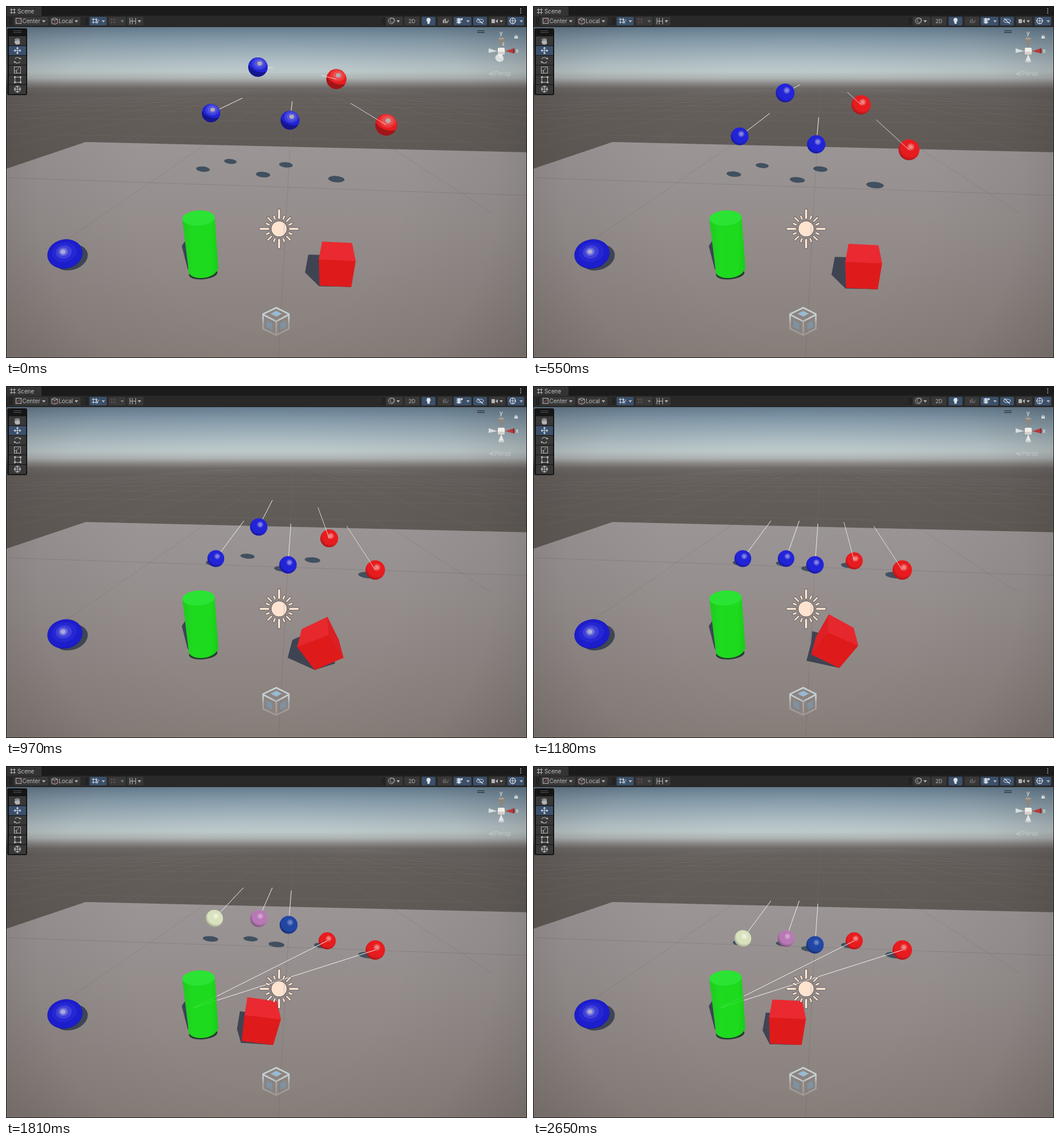
An HTML page with a canvas for the animation above (2780 ms loop, 910 px wide and 616 px high).

```html
<!DOCTYPE html>
<html lang="en">
<head>
<meta charset="utf-8">
<title>Scene</title>
<style>
html, body { margin: 0; width: 910px; height: 616px; overflow: hidden; background: #191919; }
canvas { display: block; }
</style>
</head>
<body>
<canvas id="stage" width="910" height="616"></canvas>
<script>
const W = 910, H = 616, LOOP = 2780;
let g;

// ---------- drawing helpers ----------
const mix = (a, b, p) => a + (b - a) * p;

function poly(pts, fill, stroke, width = 1) {
  g.beginPath();
  pts.forEach(([x, y]) => g.lineTo(x, y));
  if (fill) { g.closePath(); g.fillStyle = fill; g.fill(); }
  if (stroke) { g.strokeStyle = stroke; g.lineWidth = width; g.stroke(); }
}
const line = (x1, y1, x2, y2, color, width = 1) => poly([[x1, y1], [x2, y2]], null, color, width);

function oval(x, y, rx, ry, fill, rot = 0) {
  g.beginPath();
  g.ellipse(x, y, rx, ry, rot, 0, 7);
  g.fillStyle = fill;
  g.fill();
}
function ring(x, y, r, color, width = 1, from = 0, to = 6.3) {
  g.beginPath();
  g.arc(x, y, r, from, to);
  g.strokeStyle = color;
  g.lineWidth = width;
  g.stroke();
}
function rect(x, y, w, h, fill, r = 0) {
  g.beginPath();
  g.roundRect(x, y, w, h, r);
  g.fillStyle = fill;
  g.fill();
}
function frame(x, y, w, h, color) {
  g.strokeStyle = color;
  g.lineWidth = 1;
  g.strokeRect(x + .5, y + .5, w, h);
}
function text(str, x, y, color = '#b9b9b9', size = 9.8) {
  g.font = size + 'px Inter, Roboto, sans-serif';
  g.fillStyle = color;
  g.fillText(str, x, y);
}
function ramp(x0, y0, x1, y1, stops) {
  const grad = g.createLinearGradient(x0, y0, x1, y1);
  stops.forEach(([at, color]) => grad.addColorStop(at, color));
  return grad;
}

// ---------- static scenery ----------
function drawGrid(color) {
  for (let n = -9; n <= 9; n++) {
    const lean = 1.5 * n - .05;
    line(502 + 8 * lean, 145, 502 + 479 * lean, 616, color);
  }
  for (let n = 0; n < 8; n++) {
    const h = 180 / (1 + n * .9), tilt = h * .085;
    line(0, 137 + h - tilt, W, 137 + h + tilt, color);
  }
}

function drawWorld() {
  rect(0, 37, W, H, ramp(0, 37, 0, 260, [
    [0, '#677f92'], [.1, '#869cab'], [.2, '#9fb1ba'], [.3, '#b6c4c8'], [.35, '#bdc8c9'],
    [.4, '#aeb4b4'], [.44, '#8c8b89'], [.48, '#6d6966'], [.54, '#655f5c'], [1, '#605a56']]));
  g.save();
  g.beginPath();
  g.rect(0, 146, W, 120);
  g.clip();
  drawGrid('rgba(210,205,200,.06)');
  g.restore();

  g.save();
  g.beginPath();
  [[139, 238], [W, 256], [W, H], [0, H], [0, 285]].forEach(p => g.lineTo(...p));
  g.closePath();
  g.fillStyle = ramp(0, 238, 0, H, [[0, '#9b9596'], [.35, '#958e8d'], [1, '#887f7a']]);
  g.fill();
  g.clip();
  line(502, 137, 476, H, 'rgba(70,62,60,.16)');
  line(480, 152, 100, 413, 'rgba(70,62,60,.15)');
  line(520, 149, 850, 363, 'rgba(70,62,60,.15)');
  line(0, 300.5, W, 331.5, 'rgba(70,62,60,.18)');
  g.restore();

  const shade = g.createRadialGradient(455, 326, 230, 455, 326, 570);
  shade.addColorStop(0, 'rgba(20,16,16,0)');
  shade.addColorStop(.5, 'rgba(20,16,16,.05)');
  shade.addColorStop(1, 'rgba(20,16,16,.22)');
  rect(0, 37, W, H, shade);
}

function drawBlob() {
  oval(113, 440, 30.5, 22, '#3d4654', -.3);
  oval(103, 434, 31, 25.5, '#1a1bb2', -.2);
  oval(103, 433.3, 30.5, 24.5, '#1c1dcb', -.2);
  oval(102, 431, 22, 17, '#2627d3', -.2);
  oval(101, 430.5, 14, 11.5, '#3f40d8', -.2);
  oval(100, 430, 8, 7, '#6a6bdc', -.2);
  oval(99.5, 430, 4.5, 4, '#aaa9d6');
}

function drawCylinder() {
  poly([[307, 420], [313, 411], [324, 470], [317, 459]], '#3b4453');
  oval(344.5, 468.5, 25, 9.8, '#24402f', -.1);
  g.beginPath();
  g.moveTo(308, 373);
  g.lineTo(319.5, 467);
  g.bezierCurveTo(326, 481, 364, 479, 371, 459);
  g.lineTo(364.5, 370);
  g.closePath();
  g.fillStyle = ramp(308, 0, 371, 0, [[0, '#1fc91f'], [.3, '#1fda20'], [.8, '#1cda1c'], [1, '#1bc81c']]);
  g.fill();
  oval(336.3, 371, 28.3, 13.2, '#2be333', -.06);
}

function drawSun() {
  const rays = (color, grow) => {
    for (let i = 0; i < 16; i++) {
      const a = i * Math.PI / 8, end = i % 4 ? (i % 2 ? 24 : 27.5) : 32.5;
      const c = Math.cos(a), s = Math.sin(a);
      line(477 + 19 * c, 390 + 19 * s, 477 + end * c, 390 + end * s, color, (i % 4 ? 2.6 : 3.6) + grow);
    }
  };
  g.lineCap = 'round';
  rays('rgba(60,52,50,.5)', 2);
  rays('#fde6d5', 0);
  g.lineCap = 'butt';
  oval(477, 390, 14.6, 14.6, 'rgba(60,52,50,.45)');
  oval(477, 390, 13.3, 13.3, '#fee3d0');
  line(486, 379, 485.5, 399, 'rgba(150,140,135,.4)');
}

function drawProbe() {
  const edge = ramp(0, 527, 0, 577, [[0, '#cbd5d8'], [.4, '#c2ccd0'], [.55, '#a9a8a9'], [1, '#9c9796']]);
  poly([[472, 533.5], [482, 538.5], [472, 543.5], [462, 538.5]], '#9abad2');
  poly([[455, 550], [465, 555], [465, 567], [455, 562]], '#7f92a2');
  poly([[489, 550], [479, 555], [479, 567], [489, 562]], '#7f92a2');
  poly([[472, 528], [494, 539], [494, 565], [472, 576], [449, 565], [449, 539], [472, 528], [494, 539]], null, edge, 2.6);
  poly([[449, 540], [472, 552], [494, 540]], null, edge, 2.6);
  line(472, 552, 472, 576, edge, 2.6);
}

// ---------- editor chrome ----------
const GREY = '#b4b4b4', DIM = '#777';
function button(x, w, on) { rect(x, 19, w, 15, on ? '#3b506b' : '#383838', 2); }
function caret(x, color = GREY) { poly([[x - 3, 25], [x + 3, 25], [x, 29]], color); }
function hashIcon(x, y, color) {
  for (const d of [-3, 2]) {
    line(x + d + .5, y - 5, x + d + .5, y + 5, color);
    line(x - 5, y + d + .5, x + 5, y + d + .5, color);
  }
}

function drawBars(first) {
  rect(0, 0, W, 17, '#1b1b1b');
  rect(1, 1, 61, 16, '#333');
  hashIcon(12, 9, '#bbb');
  text('Scene', 20, 13, '#c4c4c4');
  for (const y of [5, 8.5, 12]) oval(899, y, 1, 1, GREY);
  rect(0, 17, W, 20, '#292929');
  for (const x of [6, 9, 139, 142, 657, 660]) line(x + .5, 20, x + .5, 33, '#171717');

  button(14, 60);
  frame(17, 21, 9, 9, GREY);
  line(19, 29, 25, 23, '#c0574a');
  text('Center', 28.5, 30);
  caret(66);
  button(77, 53);
  poly([[80, 23], [85, 21], [90, 23], [90, 30], [85, 32], [80, 30], [80, 23], [85, 25], [90, 23]], null, GREY);
  line(85, 25, 85, 32, '#c0574a');
  text('Local', 92, 30);
  caret(123);

  button(146, 30, true);
  hashIcon(155, 26, '#d0d8e0');
  text('Y', 157, 31, '#d0d8e0', 9);
  caret(170);
  button(179, 30);
  hashIcon(187, 26, '#5f4949');
  caret(203, DIM);
  button(212, 28);
  for (const x of [216.5, 220.5, 226.5]) line(x, 21, x, 32, GREY);
  line(216, 26.5, 227, 26.5, GREY);
  caret(233);

  button(664, 29);
  ring(673, 26, 5, GREY);
  ring(675, 25, 4, '#999');
  caret(685);
  button(696, 26);
  text('2D', 703, 30, '#bbb', 9);
  button(726, 24, true);
  oval(738, 24.5, 3.5, 3.8, '#dde3e8');
  rect(736, 28, 4, 3, '#dde3e8');
  button(754, 25);
  const sound = first ? GREY : '#666';
  for (const [x, h] of [[763, 6], [766, 8], [769, 4]]) rect(x, 30 - h, 2, h, sound);
  ring(770, 26, 3, sound, 1, -1, 1);
  button(782, 31, true);
  for (const y of [23, 26, 29]) poly([[786, y], [791, y - 2], [796, y], [791, y + 2]], '#d8dfe6');
  oval(796, 23, 1.8, 1.8, '#e8edf2');
  caret(807);
  button(816, 24, true);
  g.beginPath();
  g.ellipse(828, 26, 6, 3, 0, 0, 7);
  g.strokeStyle = '#d8dfe6';
  g.stroke();
  line(823, 22, 833, 31, '#d8dfe6', 1.3);
  button(844, 28);
  rect(848, 23, 6, 7, GREY);
  poly([[855, 26.5], [859, 23], [859, 30]], GREY);
  caret(865);
  button(876, 29, true);
  ring(885, 26, 5, '#d8dfe6', 1.2);
  line(879, 26, 891, 26, '#d8dfe6');
  line(885, 20, 885, 32, '#d8dfe6');
  caret(900);
}

function drawTools() {
  rect(2, 39, 35, 117, '#151515', 3);
  line(13, 43.5, 27, 43.5, '#555');
  line(13, 46.5, 27, 46.5, '#555');
  for (let i = 0; i < 6; i++) rect(5, 53 + i * 17, 30, 16, i === 1 ? '#3b506b' : '#383838', 1);
  for (let i = 0; i < 4; i++) line(16 + i * 2.4, 56 + Math.abs(i - 1.5), 17 + i * 2, 63, GREY, 1.5);
  oval(20, 64, 4.5, 3.5, GREY);
  line(15, 62, 18, 66, GREY, 1.6);
  const arrows = (y, r, color) => {
    for (let i = 0; i < 4; i++) {
      g.save();
      g.translate(20, y);
      g.rotate(i * Math.PI / 2);
      line(0, 0, 0, -r + 2, color);
      poly([[-2.5, -r + 3], [2.5, -r + 3], [0, -r]], color);
      g.restore();
    }
  };
  arrows(78, 6.5, '#d5dde6');
  ring(20, 95, 5, GREY, 1.2, .5, 2.8);
  ring(20, 95, 5, GREY, 1.2, 3.6, 5.9);
  poly([[23, 93], [27, 93], [25, 90]], GREY);
  poly([[13, 97], [17, 97], [15, 100]], GREY);
  frame(14, 106, 11, 11, GREY);
  frame(14, 113, 4, 4, GREY);
  line(18, 113, 23, 108, GREY);
  frame(15, 124, 10, 9, GREY);
  for (const x of [14, 24]) for (const y of [123, 132]) rect(x, y, 3, 3, GREY);
  ring(20, 145.5, 5.5, GREY);
  arrows(145.5, 6, GREY);
}

function drawAxes(first) {
  line(823, 43.5, 836, 43.5, '#222');
  line(823, 46.5, 836, 46.5, '#222');
  text('y', 862, 51, '#eef0f0', 10);
  text('x', 890, 82, '#eef0f0', 10);
  rect(888, 53, 6, 4, '#cfd6d8');
  ring(891, 53, 2, '#cfd6d8', 1, 3.1, 6.3);
  poly([[860, 57], [870, 57], [865, 72]], '#8f8577');
  oval(865, 57, 5, 2, '#a59a8a');
  poly([[843, 74], [843, 82], [858, 79]], '#d7dcdd');
  poly([[887, 74], [887, 83], [872, 79]], '#b83a38');
  oval(887, 78.5, 1.6, 4.5, '#8f2c2c');
  rect(859, 73, 12, 12, '#f3eeea', 2);
  rect(859, 80, 12, 5, '#d5d0cd', 2);
  if (first) {
    text('z', 866, 69, '#eef0f0', 9);
    oval(862, 91, 7.5, 6.5, '#dcdfe0', .4);
    poly([[859, 84], [868, 84], [864, 92]], '#eceded');
  } else {
    poly([[860, 97], [870, 97], [865, 84]], '#e3e6e6');
    oval(865, 97, 5, 1.8, '#c9cdcd');
  }
  const faint = 'rgba(215,220,220,.6)';
  poly([[852, 115], [844, 118.5], [852, 122]], null, faint);
  line(845, 118.5, 852, 118.5, faint);
  text('Persp', 853.5, 122, faint, 10.5);
}

// ---------- moving parts ----------
const BLUE = ['#2224d8', '#15168f', '#8384e2'], RED = ['#e81c1f', '#a01518', '#ee8582'];
const CREAM = ['#d9e2bf', '#8e967d', '#eef2de'], PINK = ['#b878b5', '#724872', '#d5a6d2'];
const NAVY = ['#2146a4', '#142a66', '#6a84c4'];

// from/to: x, y, radius in the air and on the ground; shade: x, y in the air, on the ground, size
const balls = [
  { from: [440, 107, 17], to: [442, 302, 14.5], fall: .716, tie: [466, 465, 236], shade: [392, 272, 437, 311, 12], bend: .26, skin: BLUE, next: PINK },
  { from: [577, 128, 17.5], to: [561, 306, 15], fall: .711, tie: [551, 543, 238], shade: [489, 278, 552, 314, 13], bend: .25, skin: RED },
  { from: [358, 187.5, 16], to: [366.5, 302, 14.7], fall: .645, tie: [413, 415.5, 236], shade: [344, 285.5, 363, 310, 13], bend: 0, skin: BLUE, next: CREAM },
  { from: [496, 200, 16.5], to: [492.5, 313, 15.3], fall: .667, tie: [500, 497.5, 241], shade: [449, 295, 483, 320, 13.5], bend: 0, skin: BLUE, next: NAVY },
  { from: [664, 208, 19], to: [645, 322, 17], fall: .692, tie: [602, 595, 245], shade: [577, 303, 632, 331, 15.5], bend: .05, skin: RED }
];
const SWITCH = 19, GRIP = [328, 423];

function hop(k) {
  const u = (k - 25.75) / 7.25;
  return Math.max(0, 35.5 * (1 - u * u));
}

function place(b, k) {
  const [x0, y0, r0] = b.from, [x1, y1, r1] = b.to;
  const y = Math.min(y1, y0 + b.fall * ((k + 1) ** 2 - 1)) - (b.next ? hop(k) : 0);
  const p = (y - y0) / (y1 - y0);
  return { p, y, x: mix(x0, x1, p), r: mix(r0, r1, p) };
}

function drawBall({ x, y, r }, [base, dark, light], flat) {
  if (flat) {
    oval(x, y, r, r, dark);
    g.save();
    g.beginPath();
    g.arc(x, y, r, 0, 7);
    g.clip();
    oval(x + r * .25, y - r * .45, r * 1.3, r * .95, base, .25);
    g.globalAlpha = .12;
    for (const s of [.75, .5]) oval(x + r * .15, y - r * .38, r * s, r * s * .85, '#fff');
    g.restore();
    oval(x + r * .18, y - r * .38, r * .25, r * .22, '#b3abad');
    return;
  }
  const hx = x + r * .17, hy = y - r * .27;
  const skin = g.createRadialGradient(hx, hy, 0, hx, hy, r * 1.36);
  [[0, light], [.1, light], [.3, base], [.68, base], [1, dark]].forEach(s => skin.addColorStop(...s));
  oval(x, y, r, r, skin);
}

// step, centre x, centre y, roll in degrees
const roll = [
  [0, 577, 452, 0], [3, 576.5, 456, 0], [7, 576, 456, 0], [10, 574.5, 454.5, 0], [16, 526, 446.5, 62],
  [21, 474, 442.5, 127], [25.5, 440, 447, 180], [29, 441, 447.5, 180], [37, 443, 448.5, 180]
];
const faces = [[0, 1, 3, 2], [4, 6, 7, 5], [0, 4, 5, 1], [2, 3, 7, 6], [0, 2, 6, 4], [1, 5, 7, 3]];

function drawCube(k) {
  const i = Math.max(1, roll.findIndex(r => r[0] >= k));
  const a = roll[i - 1], b = roll[i], p = (k - a[0]) / (b[0] - a[0]);
  const [, cx, cy, deg] = a.map((v, j) => mix(v, b[j], p));
  const t = (deg - 3) * Math.PI / 180, c = Math.cos(t), s = Math.sin(t);
  const pts = [];
  for (let n = 0; n < 8; n++) {
    const x = n & 1 ? 1 : -1, y = n & 2 ? 1 : -1, z = n & 4 ? 1 : -1;
    pts.push([x * c - y * s, x * s + y * c, z]);
  }
  const project = ([x, y, z]) => [cx + 26.75 * x * (1 + .084 * y + .112 * z), cy - 22.75 * y + 15.5 * z];
  const floor = Math.min(...pts.map(v => v[1]));
  const shadow = pts.map(([x, y, z]) => {
    const [sx, sy] = project([x, floor, z]), h = y - floor;
    return [sx - h * (7.5 + (cx - 441) * .045), sy - h * 12];
  });
  for (const f of faces) poly(f.map(n => shadow[n]), '#3f4453');

  const flat = pts.map(project);
  for (const f of faces) {
    const q = f.map(n => flat[n]);
    const area = q.reduce((sum, [x, y], n) => {
      const [u, v] = q[(n + 1) % 4];
      return sum + x * v - u * y;
    }, 0);
    if (area <= 0) continue;
    const up = Math.max(0, f.reduce((sum, n) => sum + pts[n][1], 0) / 4);
    const front = f.every(n => n & 4);
    const color = front ? '#df1a1b' : `rgb(${mix(205, 234, up)},${mix(22, 42, up)},${mix(26, 48, up)})`;
    poly(q, color, color, .6);
  }
}

// ---------- one picture per step ----------
const sheet = document.createElement('canvas');
sheet.width = W;
sheet.height = H;
g = sheet.getContext('2d');
drawWorld();
drawBlob();
const stage = document.getElementById('stage').getContext('2d');

function draw(k) {
  g = stage;
  g.drawImage(sheet, 0, 0);
  const late = k >= SWITCH;
  const spots = balls.map(b => place(b, k));
  balls.forEach((b, i) => {
    const [x0, y0, x1, y1, size] = b.shade, p = spots[i].p;
    const q = p * (1 - b.bend + b.bend * p);
    oval(mix(x0, x1, q), mix(y0, y1, q), size * mix(.92, 1.08, p), size * .36, '#40505f', .09);
  });
  drawCylinder();
  balls.forEach((b, i) => {
    const s = spots[i], skin = late && b.next || b.skin, red = b.skin === RED;
    const ty = b.tie[2] - .655 * (b.to[1] - s.y), tx = mix(b.tie[0], b.tie[1], s.p);
    if (!red) line(tx, ty, s.x, s.y, '#f2f2f2');
    drawBall(s, skin, k === 0);
    if (!red) return;
    if (!late) return line(tx, ty, s.x, s.y, 'rgba(245,240,240,.8)');
    const u = 41 / (s.x - GRIP[0]);
    const ex = mix(GRIP[0], s.x, u), ey = mix(GRIP[1], s.y, u);
    line(s.x, s.y, ex, ey, '#f4f2f2');
    line(ex, ey, ...GRIP, 'rgba(200,255,200,.18)');
  });
  drawCube(k);
  drawSun();
  drawProbe();
  drawAxes(k === 0);
  drawTools();
  drawBars(k === 0);
  frame(0, 0, W - 1, H - 1, '#191919');
}

function stepAt(t) {
  if (t < 130) return 0;
  if (t >= 2650) return 37;
  return 1 + Math.floor((t - (t < 2240 ? 130 : 140)) / 70);
}

const start = performance.now();
let shown = -1;
function tick() {
  const k = stepAt((performance.now() - start) % LOOP);
  if (k !== shown) draw(shown = k);
  requestAnimationFrame(tick);
}
tick();
</script>
</body>
</html>
```
